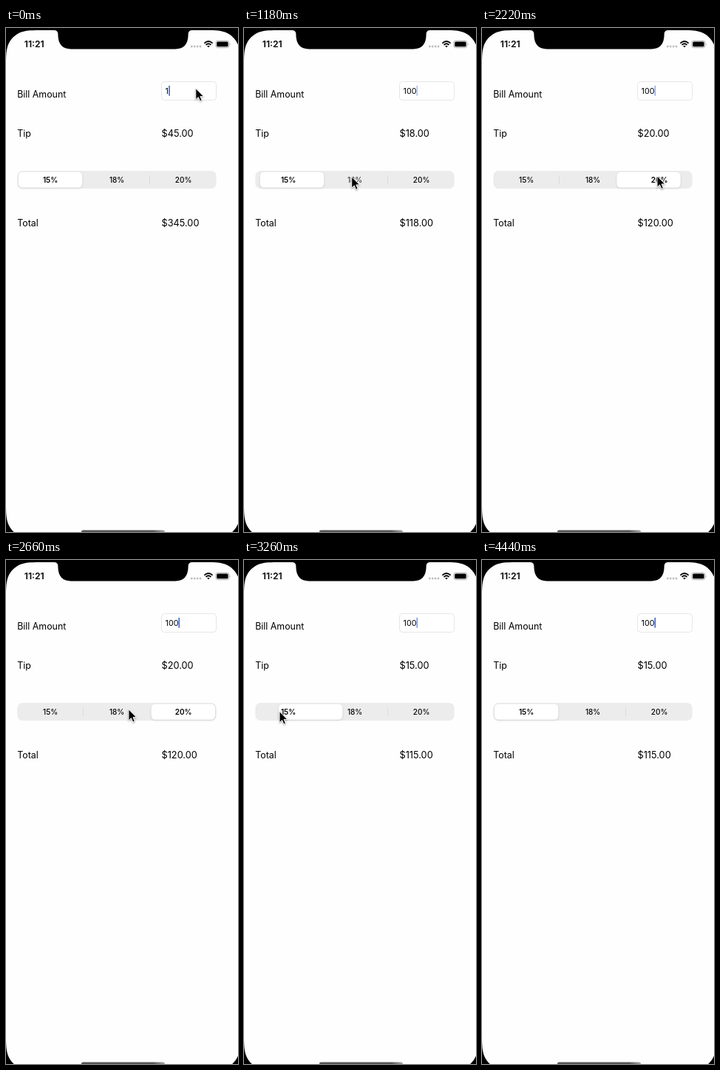
Write an HTML page that moves like this. It is 314 by 681 pixels and loops after 4540 ms.

```html
<!DOCTYPE html>
<html lang="en">
<head>
<meta charset="utf-8">
<title>Tip calculator</title>
<style>
  html, body { margin: 0; width: 100%; height: 100%; overflow: hidden; background: #000; }
  svg { display: block; width: 314px; height: 681px; }
  text { font-family: Inter, Roboto, sans-serif; fill: #000; white-space: pre; }
  .body { font-size: 12.4px; }
  .amount { font-size: 12.75px; }
  .field { font-size: 10.7px; }
  .segment { font-size: 10px; font-weight: 500; text-anchor: middle; }
  .clock { font-size: 12.2px; font-weight: 600; }
  .rule { fill: #dcdcdc; }
  #thumb { filter: drop-shadow(0 .8px .5px rgba(0, 0, 0, .07)) drop-shadow(0 1px 1.6px rgba(0, 0, 0, .12)); }
  #pointer { filter: drop-shadow(0 1px .8px rgba(0, 0, 0, .35)); }
</style>
</head>
<body>
<svg viewBox="0 0 314 681">
  <defs>
    <linearGradient id="homeFill">
      <stop offset="0" stop-color="#555"/>
      <stop offset=".86" stop-color="#555"/>
      <stop offset="1" stop-color="#aaa"/>
    </linearGradient>
    <path id="corner" d="M-1 -1V50.4H0C0 35.9 0 28.6 2.5 20.8C5.6 12.3 12.3 5.6 20.8 2.5C28.6 0 35.9 0 50.4 0V-1Z"/>
  </defs>
  <rect width="314" height="681" fill="#000"/>
  <rect y="3" width="317" height="686.5" fill="#fefefe"/>
  <use href="#corner" transform="translate(0 3)"/>
  <use href="#corner" transform="translate(317 3) scale(-1 1)"/>
  <use href="#corner" transform="translate(0 689.5) scale(1 -1)"/>
  <use href="#corner" transform="translate(317 689.5) scale(-1 -1)"/>
  <path d="M65 2V3Q70 3 70.4 8V10Q71 28.4 88 28.4H229Q246 28.4 246.6 10V8Q247 3 252 3V2Z"/>
  <rect x="102" y="678.6" width="113" height="4.2" rx="2.1" fill="url(#homeFill)"/>

  <text class="clock" x="24.8" y="26.4">11:21</text>
  <g fill="#bdbdbd">
    <circle cx="251.3" cy="25" r="1.4"/>
    <circle cx="255.2" cy="25" r="1.4"/>
    <circle cx="259.1" cy="25" r="1.4"/>
    <circle cx="263" cy="25" r="1.4"/>
  </g>
  <g fill="none" stroke="#000" stroke-width="1.8">
    <path d="M268.4 20.6Q274 15.4 279.6 20.6"/>
    <path d="M270.5 22.9Q274 19.7 277.5 22.9"/>
    <path d="M272.2 24.4Q274 23 275.8 24.4L274 26.2Z" fill="#000" stroke="none"/>
  </g>
  <rect x="283.9" y="17.3" width="18" height="9.3" rx="2.6" fill="none" stroke="#a5a5a5" stroke-width=".9"/>
  <rect x="285.2" y="18.6" width="15.4" height="6.7" rx="1.5"/>
  <path d="M303 20.5Q304.4 22 303 23.5Z" fill="#999"/>

  <text class="body" x="15.2" y="94.4">Bill Amount</text>
  <text class="body" x="15.2" y="147.4">Tip</text>
  <text class="body" x="15.2" y="268.4">Total</text>
  <text class="amount" id="tip" x="210.5" y="147.4"></text>
  <text class="amount" id="total" x="210.5" y="268.4"></text>

  <rect x="210.5" y="72.5" width="74" height="25" rx="4" fill="#fff" stroke="#e6e6e6"/>
  <text class="field" id="bill" x="215.6" y="89"></text>
  <rect id="caret" y="77.7" width="1.7" height="14" rx=".8" fill="#426bdc"/>

  <rect x="15.3" y="193" width="269.4" height="24" rx="7" fill="#ececec"/>
  <rect id="leftRule" class="rule" x="104" y="199" width="1" height="12"/>
  <rect id="rightRule" class="rule" x="194" y="199" width="1" height="12"/>
  <rect id="thumb" y="194.4" width="86.4" height="21.4" rx="5.6" fill="#fff"/>
  <text class="segment" x="60.1" y="208.6">15%</text>
  <text class="segment" x="150.1" y="208.6">18%</text>
  <text class="segment" x="240.1" y="208.6">20%</text>

  <path id="pointer" d="M0 0V15.2L3.5 11.9L5.9 17.4L8.4 16.3L6.1 10.9H10.8Z"
        stroke="#fff" stroke-width="1" stroke-linejoin="round"/>
</svg>
<script>
  const LOOP = 4540;
  const TICKS_PER_10MS = 27 / 400;
  const $ = id => document.getElementById(id);
  const labels = [...document.querySelectorAll('.segment')];

  const taps = [
    { tick: 7.85, segment: 1, tip: 18 },
    { tick: 13.68, segment: 2, tip: 20 },
    { tick: 20.71, segment: 0, tip: 15 }
  ];
  const moves = [
    { from: 3, to: 7, x: 145.7, y: 201 },
    { from: 9, to: 11.4, x: 237, y: 200 },
    { from: 17, to: 19.4, x: 48, y: 204.5 }
  ];

  const clamp = v => Math.min(1, Math.max(0, v));
  const smooth = v => (v = clamp(v), v * v * (3 - 2 * v));
  const mix = (a, b, p) => a + (b - a) * p;
  const spring = ticks => {
    const w = 2.5 * Math.max(0, ticks);
    return 1 - (1 + w) * Math.exp(-w);
  };
  const pressDip = ticks => .5 * clamp(1 - Math.abs(ticks - .4) / .5);

  function caretOpacity(tick) {
    if (tick < 5) return 1;
    const phase = (tick - 27 + 6.75 * 5) % 6.75 - 1;
    return phase < 3 ? clamp(.3 + .5 * phase) : clamp(4.75 - phase);
  }

  function draw(tick) {
    const bill = '100'.slice(0, tick + 1);
    let slot = 0, tip = 45, total = 345;
    for (const tap of taps) {
      slot = mix(slot, tap.segment, spring(tick - tap.tick));
      labels[tap.segment].style.opacity = 1 - pressDip(tick - tap.tick);
      if (tick >= tap.tick) {
        tip = tap.tip;
        total = 100 + tip;
      }
    }
    $('bill').textContent = bill;
    $('tip').textContent = `$${tip}.00`;
    $('total').textContent = `$${total}.00`;
    $('caret').setAttribute('x', 213.6 + 6.6 * bill.length);
    $('caret').setAttribute('opacity', caretOpacity(tick));

    $('thumb').setAttribute('x', 16.8 + 89.9 * slot);
    $('leftRule').setAttribute('opacity', clamp(2 * slot - 2.5));
    $('rightRule').setAttribute('opacity', clamp(1.5 - 2 * slot));
    labels.forEach((label, i) => {
      label.style.fontWeight = Math.round(slot) === i ? 600 : 500;
    });

    let x = 256.8, y = 81.5;
    for (const move of moves) {
      const p = smooth((tick - move.from) / (move.to - move.from));
      x = mix(x, move.x, p);
      y = mix(y, move.y, p);
    }
    $('pointer').setAttribute('transform', `translate(${x} ${y})`);
    $('pointer').setAttribute('visibility', tick < 23 ? 'visible' : 'hidden');
  }

  const start = performance.now();
  let shown = -1;
  function play(now) {
    const time = Math.max(0, now - start) % LOOP;
    // The picture advances in even steps, rounded down to 10 ms.
    const tick = Math.ceil((Math.floor(time / 10) + 1) * TICKS_PER_10MS) - 1;
    if (tick !== shown) draw(shown = tick);
    requestAnimationFrame(play);
  }
  play(start);
</script>
</body>
</html>
```
